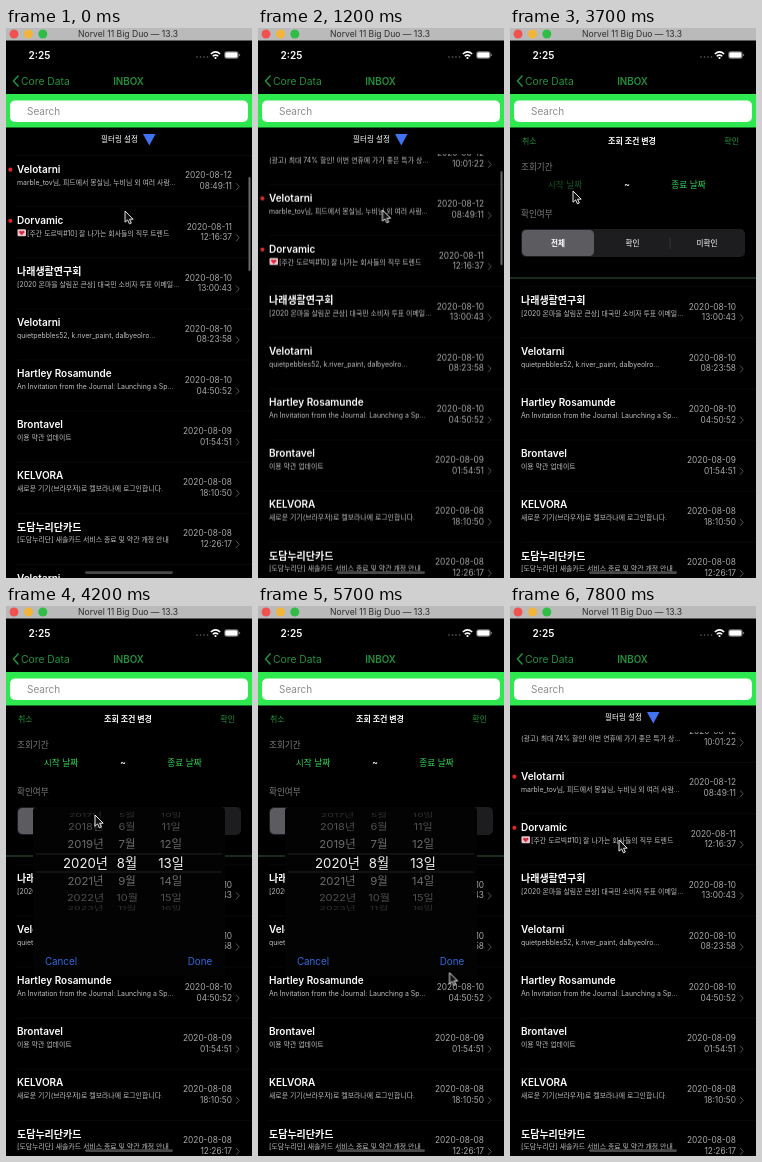
These frames come from a looping animation (246x550 px, 8 s). An HTML page:

```html
<!DOCTYPE html>
<html lang="ko">
<head>
<meta charset="utf-8">
<title>Inbox</title>
<style>
html, body { margin: 0; width: 100%; height: 100%; overflow: hidden; background: #000; }
svg { display: block; width: 100vw; height: 100vh; font-family: Inter, "Noto Sans CJK KR", "Noto Sans CJK", sans-serif; }
text { white-space: pre; }
.list, .bar, .cursor, .panel, .dialog, .start { animation: 8s linear infinite; }
.list { animation-name: scroll; }
.bar { animation-name: bar; }
.cursor { animation-name: cursor; }
.panel { animation-name: panel; }
.start { animation-name: press; }
.dialog { animation-name: dialog; transform-origin: 123px 285px; }

@keyframes scroll {
  0% { transform: translateY(0); animation-timing-function: step-end; }
  1.25% { transform: translateY(16px); animation-timing-function: step-end; }
  2.5% { transform: translateY(26px); animation-timing-function: step-end; }
  3.75% { transform: translateY(27.2px); }
  7.5%, 8.75% { transform: translateY(28px); }
  17.5%, 100% { transform: translateY(29px); }
}
@keyframes bar {
  0% { transform: translateY(0); opacity: 1; }
  2.5% { transform: translateY(-5px); }
  17.5% { transform: translateY(-6px); }
  28.75% { opacity: 1; }
  33.75%, 100% { transform: translateY(-6px); opacity: 0; }
}
@keyframes cursor {
  0% { transform: translate(119px, 183px); }
  2.5%, 8.75% { transform: translate(125.5px, 187px); }
  17.5%, 27.5% { transform: translate(124px, 180px); }
  33.75%, 36.25% { transform: translate(112px, 108px); }
  43.75%, 47.5% { transform: translate(63px, 163px); }
  52.5%, 55% { transform: translate(89px, 209px); }
  65%, 67.5% { transform: translate(193px, 411px); }
  72.5%, 73.75% { transform: translate(191px, 352px); }
  76.25%, 77.5% { transform: translate(184px, 322px); }
  83.75% { transform: translate(30px, 130px); }
  88.75%, 90% { transform: translate(14px, 111px); }
  92.5%, 93.75% { transform: translate(112px, 236px); }
  95%, 100% { transform: translate(109px, 234px); }
}
@keyframes panel {
  0%, 35% { opacity: 0; }
  38.75%, 88.75% { opacity: 1; }
  92.5%, 100% { opacity: 0; }
}
@keyframes press {
  0%, 45% { opacity: 1; }
  46%, 47.5% { opacity: .4; }
  50%, 100% { opacity: 1; }
}
@keyframes dialog {
  0%, 47.5% { opacity: 0; transform: scale(1.3); }
  51.25%, 72.5% { opacity: 1; transform: none; }
  75%, 100% { opacity: 0; transform: scale(.6); }
}
</style>
</head>
<body>
<svg viewBox="0 0 246 550" preserveAspectRatio="none">
  <defs>
    <clipPath id="listArea"><rect y="126.500" width="246" height="424"/></clipPath>
  </defs>
  <rect width="246" height="550"/>

  <g clip-path="url(#listArea)"><g class="list" id="rows"></g></g>
  <rect class="bar" x="242.5" y="149" width="2" height="94" rx="1" fill="#6a6a6a"/>
  <rect x="79" y="543.300" width="88" height="2.600" rx="1.300" fill="#484848"/>

  <g id="filter"><path d="M137 106h12.500l-6.250 11.500z" fill="#3f73f0"/></g>

  <g class="panel">
    <rect y="100" width="246" height="150"/>
    <path d="M0 250H246" stroke="#31573a"/>
    <rect x="11" y="201" width="224" height="28" rx="5" fill="#1d1d20"/>
    <rect x="12" y="202" width="72" height="26" rx="4.500" fill="#5b5b60"/>
    <path d="M160 209v12" stroke="#38383b" stroke-width=".8"/>
    <g id="panelText"></g>
  </g>

  <g id="header">
    <rect width="246" height="12.500" fill="#bbbabb"/>
    <circle cx="8" cy="6" r="4.500" fill="#f0524f"/>
    <circle cx="22.500" cy="6" r="4.500" fill="#f2b53a"/>
    <circle cx="36.800" cy="6" r="4.500" fill="#30bd45"/>
    <g fill="#666">
      <circle cx="191" cy="29" r=".8"/><circle cx="194.500" cy="29" r=".8"/>
      <circle cx="198" cy="29" r=".8"/><circle cx="201.500" cy="29" r=".8"/>
    </g>
    <path d="M204.800 26q4.700-4.200 9.400 0M206.700 28.300q2.800-2.400 5.600 0" fill="none" stroke="#fff" stroke-width="1.500"/>
    <circle cx="209.500" cy="30" r="1.100" fill="#fff"/>
    <rect x="218.500" y="23.500" width="13.800" height="7" rx="2" fill="none" stroke="#777" stroke-width=".8"/>
    <rect x="219.200" y="24.200" width="12.400" height="5.600" rx="1.300" fill="#fff"/>
    <path d="M233.600 26v2" stroke="#777"/>
    <path d="M12.500 47.500l-5 5.500 5 5.500" fill="none" stroke="#23913c" stroke-width="1.500"/>
    <rect y="66" width="246" height="33.500" fill="#2ee84f"/>
    <rect x="4" y="72.500" width="238" height="21.500" rx="5" fill="#fff"/>
  </g>

  <g class="dialog" id="dialog">
    <rect x="27" y="201" width="192" height="169" rx="4" fill="#030303"/>
    <path d="M30 248H216M30 266H216" stroke="#2b2b2d" stroke-width=".7"/>
  </g>

  <path class="cursor" d="M0 0V11.200L2.600 8.900 4.400 12.800 6.300 12 4.600 8.200H8.200Z" fill="#111" stroke="#fff" stroke-width=".9"/>
</svg>
<script>
const GREEN = '#23913c';
const LIME = '#2fd453';
const $ = id => document.getElementById(id);
const add = (id, markup) => $(id).insertAdjacentHTML('beforeend', markup);

// y is the vertical middle of the line
function label(x, y, size, words, { fill = '#fff', weight = 400, anchor = 'start', cls = '' } = {}) {
  return `<text class="${cls}" x="${x}" y="${y + size * 0.36}" font-size="${size}" fill="${fill}" ` +
    `font-weight="${weight}" text-anchor="${anchor}">${words}</text>`;
}
const centred = (x, y, size, words, opts) => label(x, y, size, words, { anchor: 'middle', ...opts });

const mails = [
  ['', '(광고) 최대 74% 할인! 이번 연휴에 가기 좋은 특가 상…', '12', '10:01:22'],
  ['Velotarni', 'marble_tov님, 피드에서 몽실님, 누비님 외 여러 사람…', '12', '08:49:11'],
  ['Dorvamic', '[주간 도르빅#10] 잘 나가는 회사들의 직무 트렌드', '11', '12:16:37'],
  ['나래생활연구회', '[2020 온마을 살림꾼 큰상] 대국민 소비자 투표 이메일…', '10', '13:00:43'],
  ['Velotarni', 'quietpebbles52, k.river_paint, dalbyeolro…', '10', '08:23:58'],
  ['Hartley Rosamunde', 'An Invitation from the Journal: Launching a Sp…', '10', '04:50:52'],
  ['Brontavel', '이용 약관 업데이트', '09', '01:54:51'],
  ['KELVORA', '새로운 기기(브라우저)로 켈보라나에 로그인합니다.', '08', '18:10:50'],
  ['도담누리단카드', '[도담누리단] 새솔카드 서비스 종료 및 약관 개정 안내', '08', '12:26:17'],
  ['Velotarni', '', '08', '']
];

const envelope = y => `<rect x="11.500" y="${y - 3.5}" width="8.500" height="7" rx="1" fill="#e6c4c8"/>
  <path d="M15.750 ${y + 2.5}l-2.800-3q.6-2.400 2.800-.8 2.200-1.600 2.800.8z" fill="#e0263f"/>`;

mails.forEach(([sender, subject, day, time], i) => {
  const y = 141.2 + (i - 1) * 51.1;
  const unread = i === 1 || i === 2;
  const hasIcon = i === 2;
  const grey = { fill: '#a9a9a9', anchor: 'end' };
  add('rows',
    `<path d="M11 ${y + 37.5}H246" stroke="#0e0e0f" stroke-width=".7"/>` +
    (unread ? `<circle cx="4.400" cy="${y + 0.5}" r="2.100" fill="#d8282b"/>` : '') +
    (hasIcon ? envelope(y + 12.5) : '') +
    label(11, y, 10, sender, { weight: 600 }) +
    label(hasIcon ? 21 : 11, y + 13, 6.9, subject, { fill: '#c0c0c0' }) +
    label(226, y + 6.3, 8.3, '2020-08-' + day, grey) +
    label(226, y + 17, 8.3, time, grey) +
    `<path d="M230 ${y + 14}l3.200 3.500-3.200 3.500" fill="none" stroke="#555"/>`);
});

add('header',
  centred(122, 6, 8.6, 'Norvel 11 Big Duo — 13.3', { fill: '#2c2c2c' }) +
  label(22.5, 27, 10, '2:25', { weight: 600 }) +
  label(15, 53, 10.3, 'Core Data', { fill: GREEN }) +
  centred(122.5, 53, 9.8, 'INBOX', { fill: GREEN, weight: 600 }) +
  label(21, 83, 10, 'Search', { fill: '#8d8d91' }));

add('filter', label(95, 111, 7.6, '필터링 설정'));

const caption = { fill: '#7c7c80' };
const action = { fill: LIME, weight: 500 };
add('panelText',
  label(12, 113.5, 8, '취소', { fill: GREEN }) +
  centred(122, 113.5, 8, '조회 조건 변경', { weight: 700 }) +
  label(229, 113.5, 8, '확인', { fill: GREEN, anchor: 'end' }) +
  label(11, 139, 8.6, '조회기간', caption) +
  centred(55, 157, 8.7, '시작 날짜', { ...action, cls: 'start' }) +
  centred(117, 157, 9, '~', { weight: 600 }) +
  centred(178.5, 157, 8.7, '종료 날짜', action) +
  label(11, 186, 8.6, '확인여부', caption) +
  ['전체', '확인', '미확인'].map((name, i) =>
    centred(48 + i * 74.5, 215, 7.6, name, { weight: i ? 500 : 700 })).join(''));

// Wheel rows shrink and darken away from the selected one
const wheelY = [209.5, 221, 238, 257, 275, 292, 302.5];
const wheelFill = ['#f2f2f2', '#6c6c6c', '#505050', '#303030'];
const wheelSquash = [1, 0.95, 0.8, 0.5];
wheelY.forEach((y, i) => {
  const step = i - 3;
  const far = Math.abs(step);
  const size = far ? 11.8 - far * 0.4 : 13.2;
  const cells = [[79.5, 2020 + step + '년'], [121, 8 + step + '월'], [165, 13 + step + '일']];
  add('dialog', `<g transform="translate(0 ${y}) scale(1 ${wheelSquash[far]})">` +
    cells.map(([x, words]) => centred(x, 0, size, words, { fill: wheelFill[far] })).join('') + '</g>');
});
const button = { fill: '#2f6be0' };
add('dialog', centred(55, 355, 9.8, 'Cancel', button) + centred(194, 355, 9.8, 'Done', button));
</script>
</body>
</html>
```
